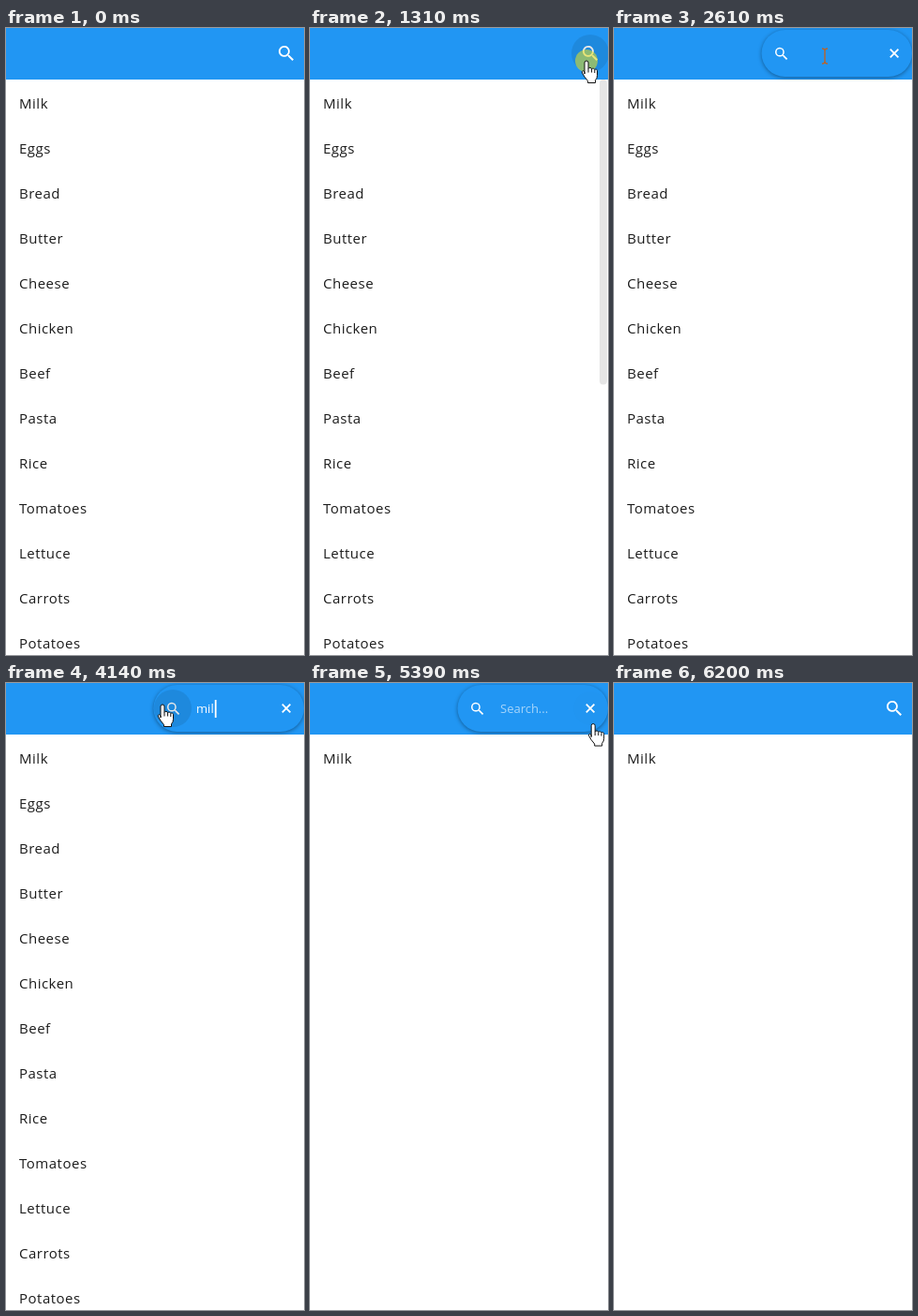
These frames come from a looping animation (318x669 px, 6440 ms). An HTML page:

```html
<!DOCTYPE html>
<html lang="en">
<head>
<meta charset="utf-8">
<title>Grocery search</title>
<style>
  html, body { margin: 0; height: 100%; overflow: hidden; background: #fff; }
  svg { display: block; width: 100vw; height: 100vh; font-family: "Open Sans", "Noto Sans", sans-serif; }
  #list { font-size: 15px; letter-spacing: .5px; fill: #1c1c1c; }
  #hint, #typed { font-size: 13px; font-weight: 500; fill: #fff; }
  #field rect { filter: drop-shadow(0 1px 2px rgba(0, 0, 0, .4)); }
  #arrow, #hand { fill: #fff; stroke: #111; stroke-width: 1; stroke-linejoin: round; }
  #beam, #dash { fill: none; stroke: #b8642c; stroke-width: 1.4; }
</style>
</head>
<body>
<svg viewBox="0 0 318 669">
  <defs>
    <path id="search" d="M15.5 14h-.8l-.3-.3A6.5 6.5 0 1 0 13.7 14.4l.3.3v.8l5 5 1.5-1.5zM9.5 14a4.5 4.5 0 1 1 0-9 4.5 4.5 0 0 1 0 9z"/>
  </defs>
  <rect width="318" height="669" fill="#fff"/>
  <g id="list"></g>
  <rect id="scrollbar" x="309" y="55" width="8" height="325.5" rx="4" fill="#e6e6e6"/>
  <rect width="318" height="55" fill="#2196f3"/>

  <rect id="pill" y="7" height="40" rx="20" fill="#1b72b5"/>
  <g id="field">
    <rect x="157.5" y="2" width="160.5" height="50" rx="25" fill="#2196f3"/>
    <use href="#search" transform="translate(169.75 18.6) scale(.75)" fill="#fff"/>
    <path d="M294.8 22.6l8.6 8.8m0-8.8l-8.6 8.8" stroke="#fff" stroke-width="1.8"/>
  </g>
  <text id="hint" y="32">Search...</text>
  <g id="button">
    <circle id="disc" r="20" fill="#2196f3" stroke="#1f8de5" stroke-width=".8"/>
    <use href="#search" transform="translate(-10.8 -10.8) scale(.917)" fill="#fff"/>
  </g>
  <text id="typed" x="203" y="32"></text>
  <rect id="caret" y="18" width="1.8" height="19" fill="#fff"/>

  <circle id="hoverOpen" cx="299" cy="27" r="20" fill-opacity=".09"/>
  <circle id="hoverGo" cx="178" cy="27" r="20" fill-opacity=".09"/>
  <circle id="hoverClose" cx="299" cy="27" r="18" fill-opacity=".07"/>
  <circle id="press" r="12" fill="#e8e11e" fill-opacity=".55"/>
  <g id="cursor">
    <path id="arrow" d="M0 0V16l3.7-3.5 2.4 5.6 2.7-1.2-2.4-5.4h5.1z"/>
    <path id="hand" d="M-2 14V2a2 2 0 0 1 4 0v6.5a1.9 1.9 0 0 1 3.6.4 1.8 1.8 0 0 1 3.2.8 1.5 1.5 0 0 1 2.7 1v5q0 3-2 5v2.8h-8v-2q-4-4.5-6-8.5-.8-2 .8-2.3 1.2 0 1.7 1.8zM2 8.5v4M5.6 9v3.5M8.8 10v3"/>
    <path id="beam" d="M-3-8Q0-8 0-6V6Q0 8-3 8M3-8Q0-8 0-6M0 6Q0 8 3 8"/>
    <path id="dash" d="M-4.5 0h9"/>
  </g>
</svg>
<script>
const LOOP = 6440;
const ITEMS = ["Milk", "Eggs", "Bread", "Butter", "Cheese", "Chicken", "Beef",
  "Pasta", "Rice", "Tomatoes", "Lettuce", "Carrots", "Potatoes"];

// Pointer stops: time, x, y, shape used from that time on
const POINTER = [
  [230, 300, 668, "arrow"], [330, 283, 500, "arrow"], [470, 269, 307, "arrow"],
  [620, 282, 148, "arrow"], [720, 290, 100, "arrow"], [870, 292, 46, "arrow"],
  [900, 292, 42, "hand"], [970, 295, 35, "hand"], [1450, 295, 35, "hand"],
  [1560, 276, 32, "beam"], [1900, 225, 30, "beam"], [3680, 225, 30, "beam"],
  [3900, 197, 27, "hand"], [4120, 167, 23, "hand"], [4530, 167, 23, "hand"],
  [4630, 198, 26, "beam"], [4800, 277, 25, "dash"], [4860, 291, 26, "hand"],
  [5000, 304, 29, "hand"], [5300, 304, 29, "hand"], [5400, 302, 45, "arrow"],
  [5650, 297, 103, "arrow"], [5750, 306, 262, "arrow"], [5800, 306, 378, "arrow"],
  [5900, 306, 533, "arrow"], [6050, 300, 623, "arrow"], [6200, 298, 680, "arrow"]
];
const PRESSES = [[1310, 1420], [2100, 2200], [4210, 4310], [5160, 5270]];
// Typing: time, text, caret position
const TYPING = [[0, "", 204], [2840, "m", 215.5], [3010, "mi", 219.3], [3180, "mil", 222.8], [5270, "", 204]];

const el = id => document.getElementById(id);
const set = (id, attrs) => { for (const k in attrs) el(id).setAttribute(k, attrs[k]); };
const show = (id, opacity) => set(id, { opacity: +opacity });
const ramp = (t, a, b) => Math.min(1, Math.max(0, (t - a) / (b - a)));
const pulse = (t, a, b, c, d) => ramp(t, a, b) * (1 - ramp(t, c, d));
const ease = p => p * p * (3 - 2 * p);
const within = (t, a, b) => t >= a && t < b;
const latest = (rows, t) => rows.filter(r => r[0] <= t).pop();

el("list").innerHTML = ITEMS.map((name, i) => `<text x="14" y="${86 + 48 * i}">${name}</text>`).join("");
const rows = [...el("list").children];

function drawPointer(t) {
  const i = POINTER.findIndex(p => p[0] > t);
  show("cursor", i > 0);
  show("press", PRESSES.some(([a, b]) => within(t, a, b)));
  if (i < 1) return;
  const [t0, x0, y0, shape] = POINTER[i - 1], [t1, x1, y1] = POINTER[i];
  const p = ramp(t, t0, t1);
  const x = x0 + (x1 - x0) * p, y = y0 + (y1 - y0) * p;
  set("cursor", { transform: `translate(${x} ${y})` });
  set("press", { cx: x, cy: y });
  for (const id of ["arrow", "hand", "beam", "dash"]) show(id, id === shape);
}

function drawSearch(t) {
  const open = ease(ramp(t, 1400, 1900)) - ease(ramp(t, 5395, 5895));
  const cx = 299 - 121 * open;
  const field = pulse(t, 1800, 1900, 5395, 5475);
  set("pill", { x: cx - 19, width: 338 - cx });
  show("pill", open > 0 && field < 1);
  show("field", field);
  set("button", { transform: `translate(${cx} 27)` });
  show("button", 1 - field);
  show("disc", open > 0);
  set("hint", { x: 203 + .79 * (cx - 178) });
  show("hint", open > 0 ? .6 * (t < 5270 ? 1 - ramp(t, 2100, 2200) : 1) : 0);

  const [, text, caretX] = latest(TYPING, t);
  el("typed").textContent = text;
  set("caret", { x: caretX });
  show("caret", within(t, 2110, 2610) || within(t, 2840, 4530));
}

function draw(t) {
  rows.forEach((row, i) => row.setAttribute("opacity", i && t >= 4340 ? 0 : 1));
  show("scrollbar", pulse(t, 350, 650, 1480, 1780));
  show("hoverOpen", pulse(t, 890, 970, 1400, 1500));
  show("hoverGo", pulse(t, 3900, 4000, 4560, 4660));
  show("hoverClose", pulse(t, 4880, 4980, 5320, 5400));
  drawSearch(t);
  drawPointer(t);
}

function frame() {
  draw(performance.now() % LOOP);
  requestAnimationFrame(frame);
}
frame();
</script>
</body>
</html>
```
